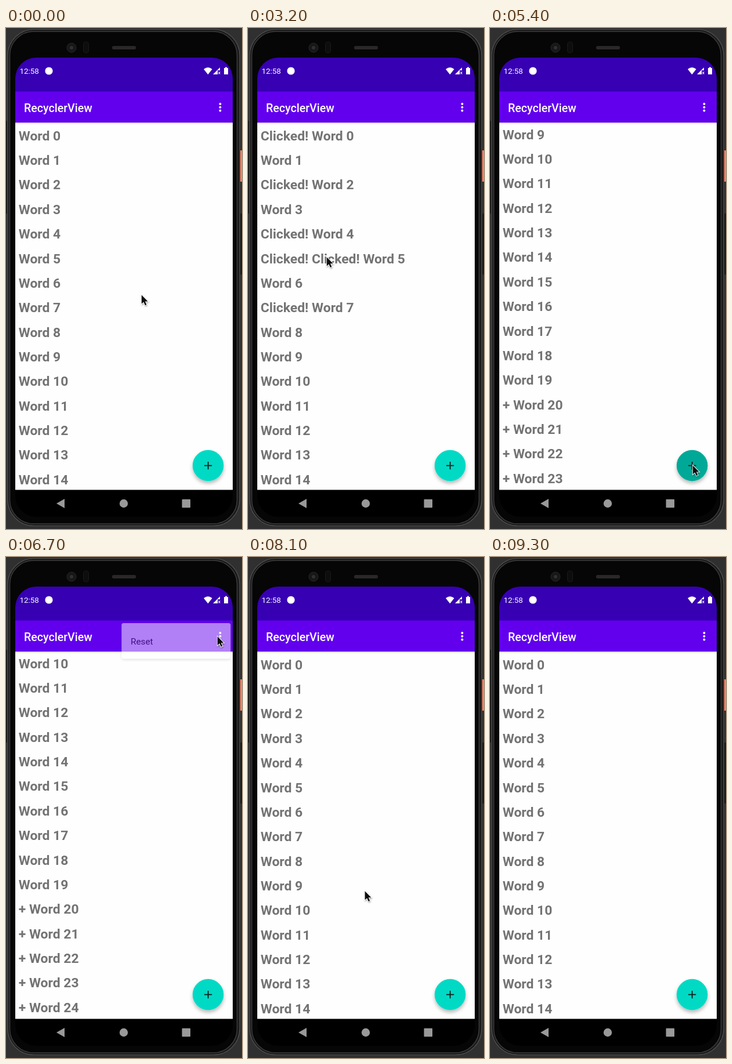
An HTML page that plays this animation: 407 by 864 pixels, repeating every 9.4 s.

```html
<!DOCTYPE html>
<html lang="en">
<head>
<meta charset="utf-8">
<title>RecyclerView demo</title>
<style>
  html, body { margin: 0; width: 100%; height: 100%; overflow: hidden; background: #303031; }
  svg { display: block; width: 407px; height: 864px; }
  text { font-family: Roboto, "Open Sans", sans-serif; }
  #list text { font-size: 22.92px; font-weight: 700; fill: #737373; }
</style>
</head>
<body>
<svg viewBox="0 0 407 864" xmlns="http://www.w3.org/2000/svg">
  <defs>
    <clipPath id="screenClip"><rect x="16" y="51" width="375" height="792" rx="36"/></clipPath>
    <clipPath id="listClip"><rect x="16" y="163" width="375" height="633.5"/></clipPath>
    <filter id="fabShadow" x="-30%" y="-30%" width="160%" height="170%">
      <feDropShadow dx="0" dy="4" stdDeviation="3.2" flood-opacity=".28"/>
    </filter>
    <filter id="menuShadow" x="-10%" y="-20%" width="120%" height="150%">
      <feDropShadow dx="0" dy="2" stdDeviation="2" flood-opacity=".25"/>
    </filter>
    <filter id="pointerShadow" x="-40%" y="-30%" width="200%" height="180%">
      <feDropShadow dx="0.5" dy="1.2" stdDeviation=".8" flood-opacity=".45"/>
    </filter>
    <linearGradient id="barShadow" x2="0" y2="1">
      <stop offset="0" stop-opacity=".2"/>
      <stop offset="1" stop-opacity="0"/>
    </linearGradient>
  </defs>

  <!-- phone body -->
  <rect width="407" height="864" fill="#303031"/>
  <path d="M0.5 160V320M405.5 320V425" stroke="#111" stroke-width="2"/>
  <rect x="404" y="211" width="3" height="54" fill="#f57f60"/>
  <rect x="3" y="2.5" width="400" height="856" rx="45" fill="#1a1a1a" stroke="#515151" stroke-width="1.2"/>
  <rect x="6.5" y="6" width="392" height="849" rx="41" fill="#060607" stroke="#3c3c3d" stroke-width="1.5"/>
  <rect x="183" y="31" width="41" height="6" rx="2.5" fill="#292727"/>
  <circle cx="113" cy="34" r="8" fill="#171717" stroke="#262626"/>
  <circle cx="113" cy="34" r="3" fill="#303034"/>
  <rect x="133.5" y="24" width="9" height="19" rx="4" fill="#0d0d0d" stroke="#191919"/>

  <!-- screen -->
  <g clip-path="url(#screenClip)">
    <rect x="16" y="51" width="375" height="792" fill="#000"/>
    <rect x="16" y="51" width="375" height="59" fill="#3700b3"/>
    <rect x="16" y="109.5" width="375" height="54" fill="#6200ee"/>
    <rect x="16" y="163" width="375" height="633.5" fill="#fefefe"/>
  </g>
  <g fill="#fff">
    <text x="23.5" y="79.3" font-size="13.4">12:58</text>
    <circle cx="74" cy="74" r="6.6"/>
    <path d="M348.3 80.2L341 71Q348.3 65 355.6 71Z"/>
    <path d="M357 80L369 68V73H365V80Z"/>
    <path d="M366.3 75.5L369.3 79.5M369.3 75.5L366.3 79.5" stroke="#fff" stroke-width="1.1"/>
    <path d="M376 69H378V67.5H381V69H383V80H376Z"/>
    <text x="31" y="144.6" font-size="19.6" font-weight="500">RecyclerView</text>
    <path d="M369.4 131v11.7" stroke="#fff" stroke-width="4" stroke-linecap="round" stroke-dasharray="0 5.8"/>
  </g>
  <g clip-path="url(#listClip)"><g id="list"></g></g>
  <rect x="16" y="163" width="375" height="3" fill="url(#barShadow)"/>

  <!-- navigation bar -->
  <g fill="#999">
    <path d="M87 820L101 812V828Z"/>
    <circle cx="203" cy="820" r="7.2"/>
    <rect x="303.5" y="812.8" width="14.5" height="14.5" rx="1"/>
  </g>

  <circle id="fab" cx="348.6" cy="754.6" r="26.8" filter="url(#fabShadow)"/>
  <path d="M341.9 754.6H355.3M348.6 747.9V761.3" stroke="#0b1f1d" stroke-width="1.9"/>

  <g id="menu">
    <rect x="199.3" y="114" width="188" height="61.2" rx="3.5" fill="#fff" filter="url(#menuShadow)"/>
    <rect id="menuPress" x="199.3" y="121.7" width="188" height="45.8" fill="#e2e2e2"/>
    <text x="215" y="151" font-size="15.3" fill="#212121">Reset</text>
  </g>

  <path id="pointer" d="M.8 1.4V16.6L4.4 13.4L7 19.2L9.4 18.2L6.9 12.5H11.6Z" fill="#080808"
        stroke="#fff" stroke-width="1.7" paint-order="stroke" filter="url(#pointerShadow)"/>
</svg>

<script>
  const LOOP = 9400, STEP = 100, RESET = 7500;
  const ROW = 42.36, VIEW = 633.3, BASE_WORDS = 20, ADDED_WORDS = 5;
  const FAB = [349, 753], DOTS = [369, 135], RESET_ITEM = [300, 144];
  const DRAG_LOW = [195, 600], DRAG_HIGH = [177, 330];

  const $ = id => document.getElementById(id);
  const set = (id, name, value) => $(id).setAttribute(name, value);
  const ramp = (t, from, to) => Math.min(1, Math.max(0, (t - from) / (to - from)));
  const smooth = u => u * u * (3 - 2 * u);
  const bottom = count => count * ROW - VIEW;
  const onWord = i => [160 - 5 * i, 182 + i * ROW];

  // tap times by word
  const taps = { 0: [1500], 2: [1700], 4: [2800], 5: [2800, 3000, 3700], 7: [2300] };
  const addTimes = Array.from({ length: ADDED_WORDS }, (_, k) => 4700 + 180 * k);

  const rows = Array.from({ length: BASE_WORDS + ADDED_WORDS }, (_, i) => {
    const row = document.createElementNS("http://www.w3.org/2000/svg", "text");
    row.setAttribute("x", 21.7);
    row.setAttribute("y", 193.75 + i * ROW);
    return $("list").appendChild(row);
  });

  function label(i, t) {
    if (i >= BASE_WORDS) {
      const shown = t < RESET && t >= addTimes[i - BASE_WORDS];
      return shown ? "+ Word " + i : "";
    }
    const count = t < RESET ? (taps[i] || []).filter(at => at <= t).length : 0;
    return "Clicked! ".repeat(count) + "Word " + i;
  }

  function pointerAt(t) {
    let point = [233, 459];
    const glide = (from, to, target) => {
      const u = smooth(ramp(t, from, to));
      point = point.map((v, axis) => v + (target[axis] - v) * u);
    };
    glide(0, 800, onWord(0));
    glide(1400, 1700, onWord(2));
    glide(1700, 2100, onWord(7));
    glide(2700, 2800, onWord(5));
    glide(3600, 4400, [FAB[0] + 8, FAB[1] + 3]);
    glide(4600, 4700, FAB);
    glide(5600, 6400, DOTS);
    glide(6600, 7200, RESET_ITEM);
    glide(RESET, 8200, DRAG_LOW);
    glide(8200, 8500, DRAG_HIGH);
    glide(8700, 9100, DRAG_LOW);
    return point;
  }

  function scrollAt(t, pointerY) {
    if (t >= 8200) return Math.min(bottom(BASE_WORDS), Math.max(0, DRAG_LOW[1] - pointerY));
    if (t >= RESET) return 0;
    // every added word pulls the list to its new end
    return addTimes.reduce((scroll, at, k) =>
      scroll + (bottom(BASE_WORDS + k + 1) - scroll) * smooth(ramp(t, at, at + 150)), 0);
  }

  function render(t) {
    const [x, y] = pointerAt(t);
    const hidden = (t > 6100 && t < 6300) || t > 9200;
    set("pointer", "transform", `translate(${x} ${y})`);
    set("pointer", "visibility", hidden ? "hidden" : "visible");

    rows.forEach((row, i) => {
      const content = label(i, t);
      if (row.textContent !== content) row.textContent = content;
    });
    set("list", "transform", `translate(0 ${-scrollAt(t, y)})`);

    const pressed = addTimes.some(at => t >= at - 100 && t <= at);
    set("fab", "fill", pressed ? "#03a997" : "#03dac5");

    set("menu", "opacity", ramp(t, 6600, 6800) * (1 - ramp(t, 7437, 7600)));
    set("menuPress", "opacity", t >= 7400 ? 1 : 0);
  }

  const start = performance.now();
  function tick() {
    const t = (performance.now() - start) % LOOP;
    render(Math.floor(t / STEP) * STEP);
    requestAnimationFrame(tick);
  }
  render(0);
  requestAnimationFrame(tick);
</script>
</body>
</html>
```
